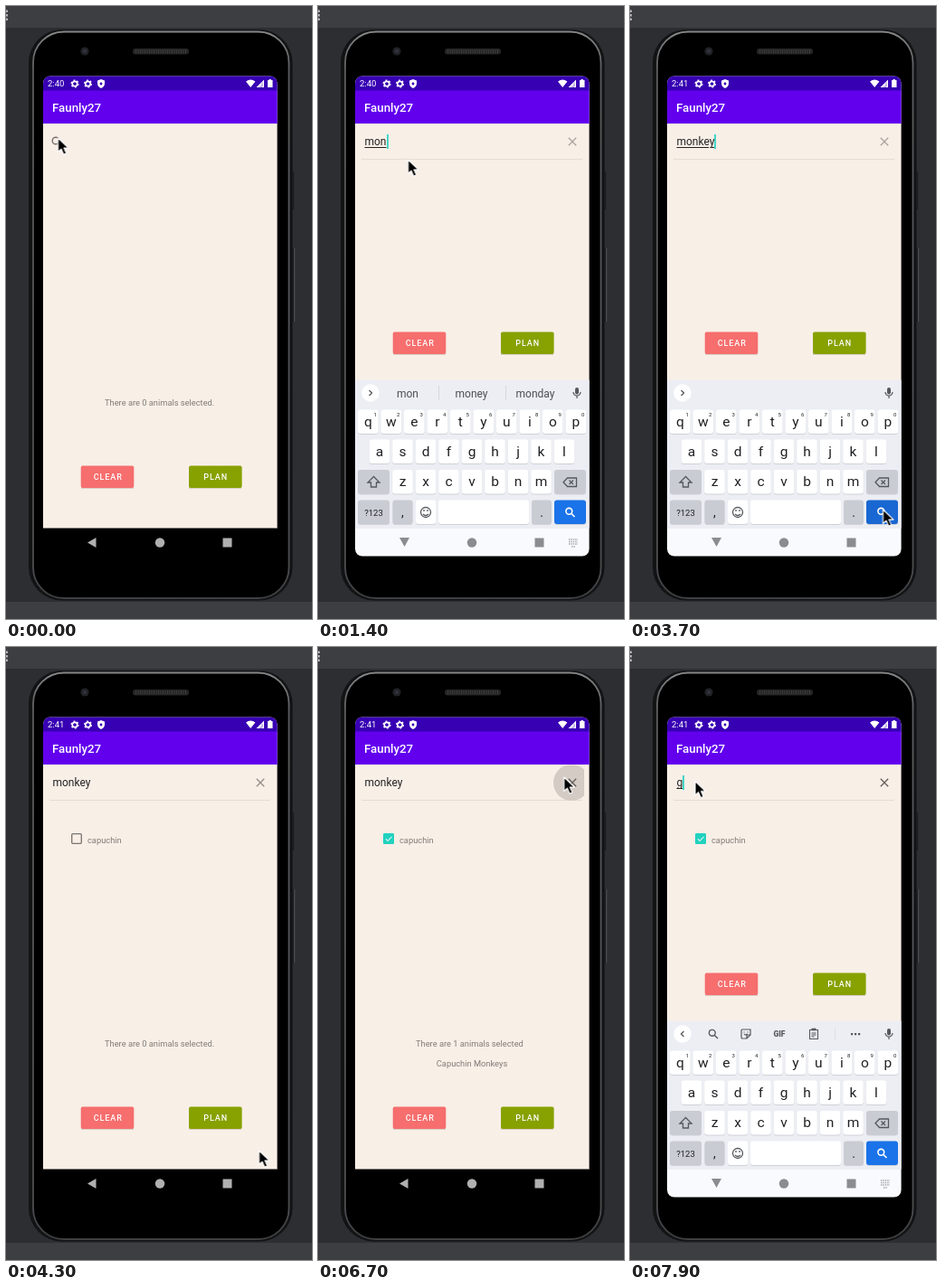
Write an HTML page that moves like this. It is 338 px wide and 678 px high and loops after 8 s.

```html
<!DOCTYPE html>
<html lang="en">
<head>
<meta charset="utf-8">
<title>Animal search</title>
<style>
html, body { margin: 0; width: 100%; height: 100%; overflow: hidden; background: #2d2e31; }
svg { position: absolute; left: 0; top: 0; width: 338px; height: 678px; }
svg, #typed { font-family: Roboto, sans-serif; }
.mid { text-anchor: middle; }
.line { fill: none; stroke: currentColor; }

/* every part shares one 8 s clock; .hard parts switch without easing */
.hard, #typed::before, #typed i { animation: 8s step-end infinite; }
.soft { animation: 8s ease-in-out infinite; }

#pointer { animation-name: pointer; }
@keyframes pointer {
  0%, 2.5% { transform: translate(57.5px, 146px); }
  6.25%, 35.6% { transform: translate(99.5px, 170px); }
  42.5%, 56.9% { transform: translate(279.5px, 557px); }
  61.25%, 63.75% { transform: translate(77.5px, 213px); }
  66.25%, 75.6% { transform: translate(133.7px, 228px); }
  81.25%, 86.25% { transform: translate(271.7px, 144px); }
  92.5%, 100% { transform: translate(72px, 148.5px); }
}

#keyboard { animation-name: slide; animation-timing-function: ease-out; }
@keyframes slide {
  0%, 3.75% { transform: translateY(196px); }
  6.9%, 48.75% { transform: none; }
  51.25%, 88.1% { transform: translateY(196px); }
  91.25%, 100% { transform: none; }
}
#buttons { animation-name: lift; }
@keyframes lift {
  0%, 48.75% { transform: none; }
  3.75%, 88.1% { transform: translateY(-148px); }
}
#summary { animation-name: summary; }
@keyframes summary { 0%, 48.75% { opacity: 1; } 3.75%, 88.1% { opacity: 0; } }

#closed { animation-name: closed; }
@keyframes closed { 0% { opacity: 1; } 2.5% { opacity: 0; } }
#field { animation-name: field; }
@keyframes field { 0% { opacity: 0; } 2.5% { opacity: 1; } }
#hint { animation-name: hint; }
@keyframes hint { 0%, 12.5%, 97.2% { opacity: 0; } 2.5%, 85.6% { opacity: 1; } }
#cross { animation-name: cross; }
@keyframes cross {
  0% { color: #aaa39d; }
  48.75% { color: #938c87; }
  80%, 100% { color: #655f5b; }
}

#typed { position: absolute; left: 51.5px; top: 142px; height: 16px; font-size: 12px; line-height: 16px; color: #222; white-space: pre; }
#typed::before { content: ""; text-decoration: underline 1px; text-underline-offset: 2px; animation-name: type; }
@keyframes type {
  0%, 85.6% { content: ""; }
  12.5% { content: "m"; }
  15% { content: "mo"; }
  16.9% { content: "mon"; }
  19.4% { content: "monk"; }
  21.25% { content: "monke"; }
  23.75% { content: "monkey"; text-decoration-color: #222; }
  48.1% { content: "monkey"; text-decoration-color: transparent; }
  97.2%, 100% { content: "g"; text-decoration-color: #222; }
}
#typed i { display: inline-block; width: 2px; height: 16px; vertical-align: top; background: #43d6c6; animation-name: caret; }
@keyframes caret {
  0%, 10%, 30%, 41.25%, 48.1%, 93.75% { opacity: 0; }
  2.5%, 12.5%, 36.25%, 45%, 87.5%, 97.2% { opacity: 1; }
}

.early { animation-name: early; }
.late { animation-name: late; }
@keyframes early { 0% { opacity: 1; } 38.75% { opacity: 0; } }
@keyframes late { 0% { opacity: 0; } 38.75% { opacity: 1; } }

#result { animation-name: result; }
@keyframes result { 0% { opacity: 0; } 48.75% { opacity: 1; } }
.zero { animation-name: zero; }
.one { animation-name: one; }
@keyframes zero { 0% { opacity: 1; } 63.75% { opacity: 0; } }
@keyframes one { 0% { opacity: 0; } 63.75% { opacity: 1; } }
#tick { animation-name: tick; }
@keyframes tick { 0% { opacity: 0; } 66.9% { opacity: 1; } }

.ripple { transform-box: fill-box; transform-origin: center; }
#tap { animation-name: tap; }
@keyframes tap {
  0%, 63% { opacity: 0; transform: scale(.5); }
  64.5%, 66.5% { opacity: .1; transform: none; }
  69%, 100% { opacity: 0; transform: none; }
}
#wipe { animation-name: wipe; }
@keyframes wipe {
  0%, 82% { opacity: 0; transform: scale(.5); }
  83.5%, 84.5% { opacity: .15; transform: none; }
  87.5%, 100% { opacity: 0; transform: none; }
}

#tools { animation-name: tools; }
#strip { animation-name: strip; }
@keyframes tools { 0%, 80% { opacity: 1; } 16.9% { opacity: 0; } }
@keyframes strip { 0%, 80% { opacity: 0; } 16.9% { opacity: 1; } }
#words1 { animation-name: words1; }
#words2 { animation-name: words2; }
#words3 { animation-name: words3; }
@keyframes words1 { 0%, 19.4% { opacity: 0; } 16.9% { opacity: 1; } }
@keyframes words2 { 0%, 23.75% { opacity: 0; } 19.4% { opacity: 1; } }
@keyframes words3 { 0%, 45% { opacity: 0; } 23.75% { opacity: 1; } }
#switcher { animation-name: switcher; }
@keyframes switcher { 0%, 86% { opacity: 1; } 45% { opacity: 0; } }
#go { animation-name: go; }
@keyframes go { 0%, 48.1% { fill: #1a73e8; } 45.6% { fill: #1967d2; } }
</style>
</head>
<body>
<svg viewBox="0 0 338 678">
  <defs>
    <clipPath id="screen"><rect x="41" y="77.5" width="258.600" height="531" rx="8"/></clipPath>
    <clipPath id="crossBox"><rect x="260" y="130.500" width="34" height="39" rx="3"/></clipPath>
    <g id="mag" class="line"><circle cx="-1.2" cy="-1.2" r="3.4"/><path d="M1.4 1.4 5 5"/></g>
    <g id="gear"><circle r="2.7" fill="none" stroke="#fff" stroke-width="1.7"/><circle r="3.9" fill="none" stroke="#fff" stroke-width="1.3" stroke-dasharray="2 2.08"/></g>
    <g id="mic"><rect x="-2" y="-6" width="4" height="7.4" rx="2" fill="#55585d"/><path class="line" d="M-4-1a4 4 0 0 0 8 0M0 3V6" stroke-width="1.2"/></g>
    <linearGradient id="rim" x2="0" y2="1">
      <stop offset="0" stop-color="#858688"/><stop offset=".07" stop-color="#5b5c5e"/>
      <stop offset=".95" stop-color="#4c4d4f"/><stop offset="1" stop-color="#3e3f41"/>
    </linearGradient>
  </defs>

  <!-- emulator window and handset -->
  <path fill="#2d2e31" d="M0 0h338v678H0z"/>
  <path fill="#3d3e42" d="M0 0h338v24H0zM0 659h338v19H0z"/>
  <path fill="#b0b1b4" d="M0 4.500h2v2.400H0zM0 9h2v2.400H0zM0 13.500h2v2.400H0z"/>
  <path stroke="#1c1d1f" stroke-width="1.5" d="M317.300 183v42M317.300 268v81"/>
  <path stroke="#55565a" d="M318.700 268v81"/>
  <rect x="25" y="26" width="291.500" height="631.500" rx="37" fill="#121314"/>
  <rect x="30" y="28.500" width="282.500" height="626.500" rx="34" stroke="url(#rim)" stroke-width="1.800"/>
  <circle cx="87" cy="50" r="4.600" fill="#202226"/><circle cx="87" cy="50" r="2" fill="#30353f"/>
  <rect x="140" y="47" width="62" height="6.500" rx="3" fill="#252526"/>
  <path stroke="#3c3c3d" stroke-width="4" stroke-dasharray="1 1.5" d="M143 50.200H199"/>

  <g clip-path="url(#screen)">
    <path fill="#f8efe7" d="M41 77h259v501H41z"/>
    <path fill="#6200ee" d="M41 93h259v37H41z"/>
    <path fill="#3700b3" d="M41 77h259v16.500H41z"/>
    <path d="M41 577.500h259v32H41z"/>
    <g fill="#fff">
      <g font-size="9.5">
        <text class="hard early" x="46" y="89">2:40</text>
        <text class="hard late" x="46" y="89">2:41</text>
      </g>
      <use href="#gear" x="76" y="86"/><use href="#gear" x="90.5" y="86"/>
      <path d="M105 81l4 1.600v3q0 3.600-4 5.400-4-1.800-4-5.400v-3z"/>
      <circle cx="105" cy="86" r="1.4" fill="#3700b3"/>
      <path d="M265 83.500q5.200-4 10.400 0L270.200 90zM285 81.500V90h-8.500zM289 82h1.500v-1h2.500v1h1.500v8h-5.500z"/>
      <path d="M283 84.500V89h-3" fill="none" stroke="#7b55cc" stroke-width=".8"/>
      <text x="51" y="117" font-size="13.3" font-weight="500">Faunly27</text>
    </g>

    <g id="closed" class="hard" color="#777069"><path class="line" d="M57.500 151.500l3.500 3.500" stroke-width="1.500"/><circle class="line" cx="55" cy="149" r="3.800" stroke-width="1.400"/></g>
    <g id="field" class="hard">
      <path stroke="#e7dcd4" d="M48 169.500H292"/>
      <g id="hint" class="hard" color="#aaa39d"><use href="#mag" x="61.500" y="151" stroke-width="1.3"/></g>
      <g clip-path="url(#crossBox)"><circle id="wipe" class="soft ripple" cx="280" cy="150" r="20"/></g>
      <g id="cross" class="hard"><path class="line" d="M276.800 145.800l8.400 8.400m0-8.400l-8.400 8.400" stroke-width="1.3"/></g>
    </g>

    <g id="result" class="hard">
      <circle id="tap" class="soft ripple" cx="78" cy="212" r="12"/>
      <rect class="hard zero" x="72.700" y="206.700" width="10.600" height="10.600" rx="1" fill="none" stroke="#7a746f" stroke-width="1.3"/>
      <rect class="hard one" x="72" y="206" width="12" height="12" rx="1.200" fill="#22d2bf"/>
      <path id="tick" class="hard" d="M74.800 212.200l2.200 2.200 4.500-4.600" fill="none" stroke="#d9f2ec" stroke-width="1.1"/>
      <text x="90" y="216.500" font-size="9.3" fill="#827c77">capuchin</text>
    </g>

    <g id="summary" class="hard" font-size="9.3" fill="#827c77">
      <text class="hard zero" x="109" y="441.500">There are 0 animals selected.</text>
      <g class="hard one">
        <text x="108" y="441.500">There are 1 animals selected</text>
        <text class="mid" x="170" y="463.500">Capuchin Monkeys</text>
      </g>
    </g>

    <g id="buttons" class="hard mid" font-size="9" font-weight="500" letter-spacing=".9">
      <path fill="#d9cdc4" d="M83 532h58v2H83zM202 532h58v2H202z"/>
      <rect x="82.700" y="508.500" width="58.600" height="24.500" rx="2" fill="#f66e6e"/>
      <rect x="202" y="508.500" width="58.600" height="24.500" rx="2" fill="#87a100"/>
      <g fill="#fff"><text x="112.800" y="524">CLEAR</text><text x="231.700" y="524">PLAN</text></g>
    </g>

    <g fill="#b0b0b0">
      <path d="M90 593.500l9.500-5.500v11zM239.500 588.500h10v10h-10z"/><circle cx="170" cy="593.500" r="5.200"/>
    </g>

    <g id="keyboard" class="soft" color="#55585d">
      <path fill="#eceef4" d="M41 413.500h259v196H41z"/>
      <path fill="#f9fafd" d="M41 578h259v31H41z"/>
      <circle cx="58" cy="428" r="9.700" fill="#fff"/>
      <g id="tools" class="hard">
        <path class="line" d="M59.500 425l-3 3 3 3" stroke-width="1.3"/>
        <use href="#mag" x="92" y="428" stroke-width="1.4"/>
        <path class="line" d="M124 423h9v6l-4 4h-5q-1 0-1-1v-8q0-1 1-1M133 429h-4v4M126 428q1.500 2 3.500 0M126 425.500v1M130 425.500v1" stroke-width="1.2"/>
        <text class="mid" x="165" y="431" font-size="8.500" font-weight="900" fill="#55585d">GIF</text>
        <path class="line" d="M198.500 423.500h9v10h-9zM200.500 427h5M200.500 429h5M200.500 431h3" stroke-width="1.1"/>
        <path class="line" d="M200.500 423h5" stroke-width="2.6"/>
        <path stroke="#dcdee3" d="M226.500 422v12"/>
        <path fill="#55585d" d="M244 427h2.200v2.200H244zM248 427h2.200v2.200H248zM252 427h2.200v2.200H252z"/>
      </g>
      <g id="strip" class="hard"><path class="line" d="M56.500 425l3 3-3 3" stroke-width="1.3"/></g>
      <g id="words" class="mid" font-size="12" fill="#4b4e53"></g>
      <use href="#mic" x="286" y="428"/>
      <g id="keys" class="mid" fill="#202124"></g>
      <g class="line" stroke-width="1.3">
        <path d="M61.500 520.500l-6.500 6.500h3.500v5h6v-5h3.500z"/>
        <path d="M275.500 522h10v9.500h-10l-4.500-4.750zM277.500 524.500l4.500 4.500m0-4.500l-4.500 4.500"/>
        <circle cx="119" cy="560" r="5.500"/><path d="M116 562q3 3 6 0M117 557v2M121 557v2"/>
      </g>
      <g color="#fff"><use href="#mag" x="278.500" y="560" stroke-width="1.6"/></g>
      <g fill="#8b8c90">
        <path d="M90 588h11l-5.500 10zM239.500 588.500h10v10h-10z"/><circle cx="170" cy="593.500" r="5.200"/>
      </g>
      <g id="switcher" class="hard" stroke="#a2a3a7" stroke-width="1.3" stroke-dasharray="1.4 1">
        <path d="M277 590h10M277 592.500h10M277 595h10"/><path d="M280 598h4"/>
      </g>
    </g>
  </g>
</svg>

<div id="typed"><i></i></div>

<svg viewBox="0 0 338 678">
  <g id="pointer" class="soft">
    <path d="M0 0V15.500l3.600-3.300 2.600 6 2.900-1.300-2.600-5.800h5z" stroke="#fff" stroke-width="1.1" stroke-linejoin="round"/>
  </g>
</svg>

<script>
const byId = id => document.getElementById(id);
const label = (x, y, s, size) => `<text x="${x}" y="${y}" font-size="${size}">${s}</text>`;

function key(x, y, w, fill = "#fff", attrs = "") {
  const box = dy => `x="${x}" y="${y + dy}" width="${w}" height="26.5" rx="3"`;
  return `<rect ${box(1)} fill="#cfd1d7"/><rect ${box(0)} fill="${fill}" ${attrs}/>`;
}

function row(letters, x, y, digits = "") {
  return [...letters].map((c, i) => {
    const cx = x + i * 25.5;
    return key(cx - 11.3, y, 22.6) + label(cx, y + 18.3, c, 15.5) +
      (digits ? label(cx + 8, y + 7.5, digits[i], 6) : "");
  }).join("");
}

const grey = "#c9ccd3";
byId("keys").innerHTML =
  row("qwertyuiop", 55.3, 446.5, "1234567890") +
  row("asdfghjkl", 68, 479.5) +
  key(44, 513, 35, grey) + row("zxcvbnm", 93.5, 513) + key(261, 513, 35, grey) +
  key(44, 546.5, 35, grey) + label(61.5, 563.5, "?123", 9.5) +
  key(82.5, 546.5, 22, grey) + label(93.5, 565, ",", 14) +
  key(108, 546.5, 22.5) + key(133, 546.5, 100) +
  key(236, 546.5, 22, grey) + label(247, 565, ".", 14) +
  key(261, 546.5, 35, "#1a73e8", 'id="go" class="hard"');

const words = ["mon money monday", "monk monkey monks", "monke monkey monkeys"];
byId("words").innerHTML = words.map((set, n) =>
  `<g id="words${n + 1}" class="hard"><path stroke="#d5d7dc" d="M133.5 420v16M207.5 420v16"/>` +
  set.split(" ").map((w, i) => label(99 + i * 70.5, 432.5, w, 12)).join("") + "</g>"
).join("");
</script>
</body>
</html>
```
